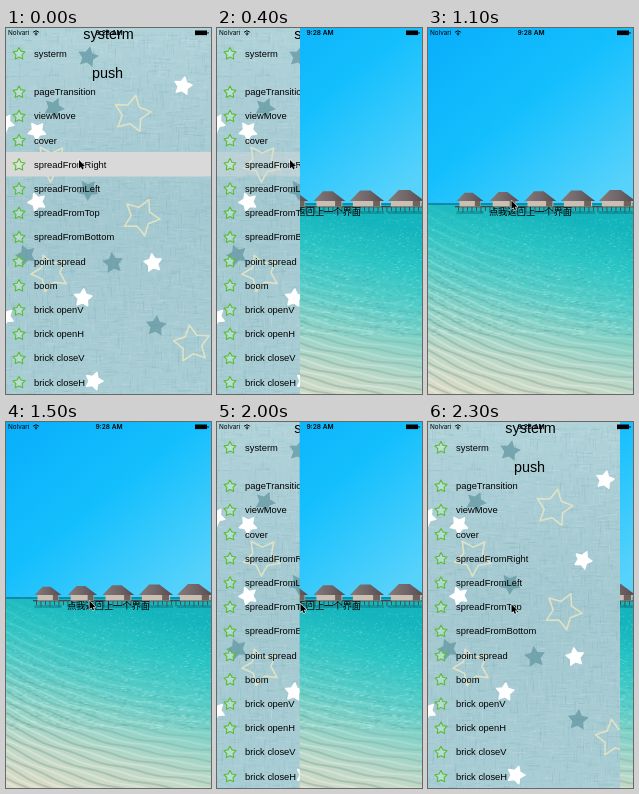
Animation, 205 px wide and 366 px high, one loop 2400 ms. Source, as an HTML page with a canvas:

```html
<!DOCTYPE html>
<html lang="en">
<head>
<meta charset="utf-8">
<title>Page transition</title>
<style>
html, body { margin: 0; width: 100%; height: 100%; overflow: hidden; background: #a9cdd4; }
canvas { display: block; width: 205px; height: 366px; }
</style>
</head>
<body>
<canvas id="stage"></canvas>
<script>
const W = 205, H = 366, LOOP = 2400, STEP = 100;
const OPEN_AT = 65, CLOSE_AT = 1773, SWEEP = 563;
const HORIZON = 176;
const scale = Math.max(1, window.devicePixelRatio || 1);
const SANS = '"Liberation Sans", Arial, sans-serif';
const UI = 'Inter, Roboto, sans-serif';
const CJK = '"Noto Sans CJK SC", "Noto Sans CJK", sans-serif';
const ROWS = ['pageTransition', 'viewMove', 'cover', 'spreadFromRight', 'spreadFromLeft',
  'spreadFromTop', 'spreadFromBottom', 'point spread', 'boom', 'brick openV',
  'brick openH', 'brick closeV', 'brick closeH'];

const clamp = v => Math.min(1, Math.max(0, v));

function setup(canvas) {
  canvas.width = Math.round(W * scale);
  canvas.height = Math.round(H * scale);
  const c = canvas.getContext('2d');
  c.scale(scale, scale);
  return c;
}

function layer(paint) {
  const canvas = document.createElement('canvas');
  paint(setup(canvas));
  return canvas;
}

function seeded(seed) {
  return () => (seed = (seed * 16807) % 2147483647) / 2147483647;
}

// colours spread evenly along the line
function gradient(c, x0, y0, x1, y1, ...colors) {
  const g = c.createLinearGradient(x0, y0, x1, y1);
  colors.forEach((color, i) => g.addColorStop(i / (colors.length - 1), color));
  return g;
}

function star(c, x, y, r, turn = 0) {
  c.beginPath();
  for (let i = 0; i < 10; i++) {
    const a = turn - Math.PI / 2 + i * Math.PI / 5;
    const d = i % 2 ? r * 0.52 : r;
    c.lineTo(x + d * Math.cos(a), y + d * Math.sin(a));
  }
  c.closePath();
}

function stars(c, r, spots, finish) {
  spots.forEach(([x, y], i) => {
    star(c, x, y, r, 0.2 + i * 0.23);
    finish();
  });
}

function text(c, str, x, y, font, align = 'left') {
  c.font = font;
  c.textAlign = align;
  c.textBaseline = 'alphabetic';
  c.fillStyle = '#000';
  c.fillText(str, x, y);
}

const cloth = layer(c => {
  const rnd = seeded(41);
  c.fillStyle = gradient(c, 0, 0, 0, H, '#b0d2d9', '#a3c8d0', '#a9cdd4');
  c.fillRect(0, 0, W, H);
  for (let i = 0; i < 3600; i++) {
    c.fillStyle = rnd() < 0.5 ? 'rgba(235,248,250,.13)' : 'rgba(70,125,140,.1)';
    const across = rnd() < 0.6, n = 3 + rnd() * 10;
    c.fillRect(rnd() * W - 4, rnd() * H, across ? n : 0.7, across ? 0.7 : n);
  }
  c.lineJoin = 'round';
  c.lineWidth = 1.6;
  c.fillStyle = 'rgba(99,151,162,.75)';
  stars(c, 11, [[82, 29], [48, 80], [82, 162], [20, 227], [107, 235], [150, 298]], () => c.fill());
  c.strokeStyle = 'rgba(234,230,195,.85)';
  stars(c, 19, [[126, 86], [135, 189], [45, 135], [44, 245], [186, 316]], () => c.stroke());
  c.fillStyle = c.strokeStyle = '#fff';
  stars(c, 9, [[177, 58], [155, 138], [31, 103], [31, 174], [147, 235], [77, 270], [88, 353],
    [-1, 95], [-1, 289]], () => { c.fill(); c.stroke(); });
});

function hut(c, x, w) {
  const left = x - w / 2, top = HORIZON - 3.5;
  c.fillStyle = 'rgba(10,100,110,.4)';
  c.fillRect(left, HORIZON + 7, w, 3);
  c.fillStyle = '#cbbfb3';
  c.fillRect(left + 3, top, w - 6, 6);
  c.fillStyle = '#6d625c';
  c.fillRect(x + w * 0.18, top, w * 0.2, 6);
  c.fillStyle = gradient(c, left, 0, left + w, 0, '#857c78', '#71666a', '#55494d');
  c.beginPath();
  c.moveTo(left, top + 0.5);
  c.lineTo(x - w * 0.2, top - w * 0.29);
  c.lineTo(x + w * 0.1, top - w * 0.29);
  c.lineTo(left + w, top + 0.5);
  c.fill();
}

const beach = layer(c => {
  const rnd = seeded(77);
  c.fillStyle = gradient(c, 0, 0, 150, 190, '#09aefb', '#14bffd', '#56d2fb');
  c.fillRect(0, 0, W, HORIZON);
  c.fillStyle = gradient(c, 75, HORIZON, 35, H,
    '#14b5bd', '#2cc5c5', '#55cdc8', '#8ed3c8', '#bed8c8', '#d8dac6');
  c.fillRect(0, HORIZON, W, H - HORIZON);
  c.fillStyle = '#1089ab';
  c.fillRect(0, HORIZON - 1, W, 2);

  // glitter on the water
  for (let i = 0; i < 2200; i++) {
    const d = rnd();
    c.fillStyle = rnd() < 0.5 ? 'rgba(215,255,250,.22)' : 'rgba(0,125,135,.15)';
    c.fillRect(rnd() * W, HORIZON + 6 + d * 125, 1 + d * 3, 0.8);
  }

  // slanted sand ripples, clearer toward the shore
  const ripple = rgb => gradient(c, 120, 215, 70, 320, `rgba(${rgb},0)`, `rgba(${rgb},.28)`);
  const dark = ripple('95,130,118'), light = ripple('255,255,238');
  for (let i = 0; i < 40; i++) {
    c.strokeStyle = i % 2 ? light : dark;
    c.lineWidth = 2;
    c.beginPath();
    for (let x = 0; x <= W + 4; x += 4) {
      c.lineTo(x, 150 + i * 5.4 + 75 * (1 - Math.exp(-x / 130)) + Math.sin(x / 9 + i * 1.7) * 0.9);
    }
    c.stroke();
  }

  c.fillStyle = '#4b4745';
  c.fillRect(27, HORIZON + 2, W - 27, 1.3);
  for (let x = 30; x < W; x += 4.5) c.fillRect(x, HORIZON + 2, 0.9, 5 + (x % 3));
  for (let i = 0; i < 5; i++) hut(c, 42 + 33.6 * i + 0.8 * i * i, 27 + 2.4 * i);
});

const ctx = setup(document.getElementById('stage'));

function row(label, y) {
  star(ctx, 13, y + 0.3, 6.3);
  ctx.fillStyle = 'rgba(235,250,220,.3)';
  ctx.fill();
  ctx.strokeStyle = '#57bd35';
  ctx.lineWidth = 1.1;
  ctx.lineJoin = 'round';
  ctx.stroke();
  text(ctx, label, 28, y + 3.2, '9.4px ' + SANS);
}

function drawList(glow) {
  ctx.drawImage(cloth, 0, 0, W, H);
  ctx.fillStyle = `rgba(217,217,217,${glow})`;
  ctx.fillRect(0, 124, W, 24.5);
  text(ctx, 'systerm', W / 2, 11, '14.4px ' + SANS, 'center');
  text(ctx, 'push', W / 2 - 1, 49.5, '14.4px ' + SANS, 'center');
  row('systerm', 25.5);
  ROWS.forEach((label, i) => row(label, 64 + i * 24.2));
}

function drawBeach(edge) {
  ctx.save();
  ctx.beginPath();
  ctx.rect(edge, 0, W - edge, H);
  ctx.clip();
  ctx.drawImage(beach, 0, 0, W, H);
  text(ctx, '点我返回上一个界面', W / 2, 186.5, '9.2px ' + CJK, 'center');
  ctx.restore();
}

function drawStatus() {
  text(ctx, 'Nolvari', 2, 7.2, '6.4px ' + UI);
  text(ctx, '9:28 AM', W / 2 + 0.5, 7.2, '600 6.6px ' + UI, 'center');
  ctx.strokeStyle = '#000';
  ctx.lineWidth = 1;
  [2, 4].forEach(r => {
    ctx.beginPath();
    ctx.arc(30, 7, r, -Math.PI * 0.76, -Math.PI * 0.24);
    ctx.stroke();
  });
  ctx.fillRect(29.4, 6, 1.3, 1.3);
  ctx.fillRect(189, 2.5, 12, 4.6);
  ctx.fillRect(201.5, 4, 1, 1.8);
}

const arrow = new Path2D('M0 0V8.4L1.9 6.7 3.2 9.5 4.6 8.9 3.4 6.2 6 6.1Z');

function drawCursor(x, y) {
  ctx.save();
  ctx.translate(x, y);
  ctx.strokeStyle = 'rgba(255,255,255,.85)';
  ctx.lineWidth = 1.2;
  ctx.stroke(arrow);
  ctx.fillStyle = '#000';
  ctx.fill(arrow);
  ctx.restore();
}

function draw(t) {
  const opened = clamp((t - OPEN_AT) / SWEEP), closed = clamp((t - CLOSE_AT) / SWEEP);
  const rest = Math.max(0, t - 400);
  const settle = tau => 1 - Math.exp(-rest / tau);
  drawList(clamp(1 - (t - 100) / 500));
  drawBeach(W * (1 - opened + closed));
  drawStatus();
  drawCursor(73 + 10.5 * settle(130), 132 + 51 * settle(440));
}

const start = performance.now();
function tick() {
  // small lead so that rounding never shows the previous step
  const t = (performance.now() - start + 5) % LOOP;
  draw(Math.floor(t / STEP) * STEP);
  requestAnimationFrame(tick);
}
tick();
</script>
</body>
</html>
```
